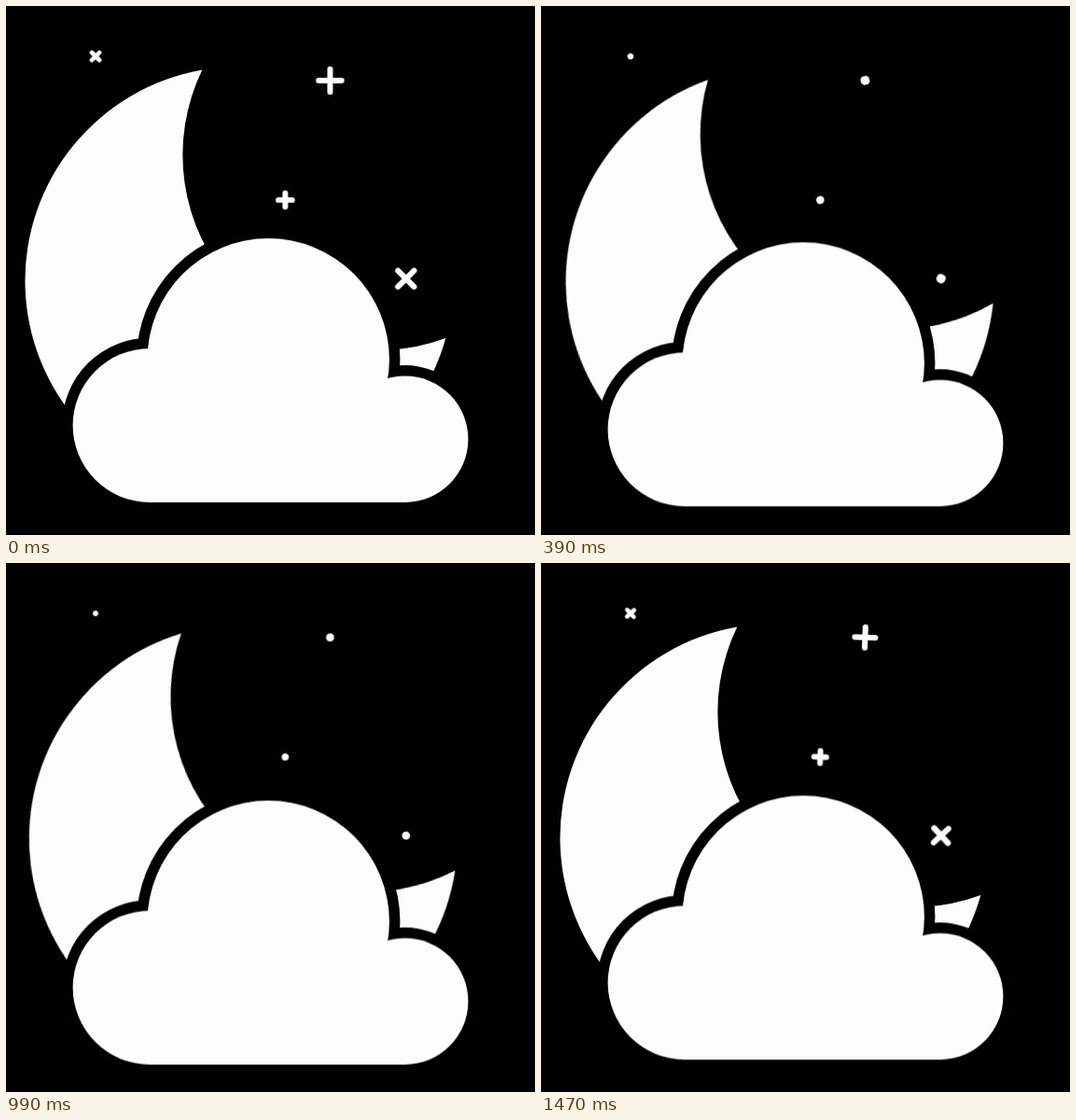
Animation, 567 px wide and 567 px high, one loop 1.5 s. Source, as an HTML page:

```html
<!DOCTYPE html>
<html lang="en">
<head>
<meta charset="utf-8">
<title>Cloudy night</title>
<style>
  html, body {
    margin: 0;
    width: 100%;
    height: 100%;
    overflow: hidden;
    background: #010101;
  }
  svg {
    display: block;
    width: 567px;
    height: 567px;
    fill: #fcfcfc;
  }

  .moon {
    transform-origin: 257.4px 258.9px;
    animation: swing 1.5s ease infinite;
  }
  .cloud { animation: sink .75s linear infinite alternate; }
  .gap {
    fill: #010101;
    stroke: #010101;
    stroke-width: 23px;
  }

  .star path {
    fill: none;
    stroke: #fcfcfc;
    stroke-linecap: round;
    stroke-width: var(--thin);
    vector-effect: non-scaling-stroke;
    animation:
      shrink .75s cubic-bezier(.3333, 1, .6667, 1) infinite alternate,
      spin .75s linear infinite alternate;
  }

  @keyframes swing {
    0%, 100% { transform: rotate(0deg); }
    51.7%, 54.3% { transform: rotate(-12deg); }
  }
  @keyframes sink {
    to { transform: translateY(8.2px); }
  }
  @keyframes shrink {
    from { scale: 1; }
    to { scale: .02; }
  }
  @keyframes spin {
    from { rotate: 0deg; stroke-width: var(--thin); }
    to { rotate: 55deg; stroke-width: var(--dot); }
  }
</style>
</head>
<body>
<svg viewBox="0 0 567 567">
  <defs>
    <g id="puffs">
      <circle cx="281.2" cy="378.8" r="129.7"/>
      <circle cx="154" cy="449.5" r="82.4"/>
      <circle cx="427.7" cy="464.2" r="67.7"/>
      <path d="M154 449.5L281 378.8L427.7 464.2V531.9H154Z"/>
    </g>
  </defs>

  <path class="moon" d="M210.3 68.5A229.6 229.6 0 1 0 471.3 356A209.3 209.3 0 0 1 210.3 68.5Z"/>

  <g class="cloud">
    <use href="#puffs" class="gap"/>
    <use href="#puffs"/>
  </g>

  <g class="star" transform="translate(347.4 79.8)" style="--thin:6px;--dot:8px">
    <path d="M-12.3 0H12.3M0-12.3V12.3"/>
  </g>
  <g class="star" transform="translate(299.3 208)" style="--thin:5.9px;--dot:7.4px">
    <path d="M-7.4 0H7.4M0-7.4V7.4"/>
  </g>
  <g class="star" transform="translate(428.8 292.2) rotate(45)" style="--thin:6px;--dot:8px">
    <path d="M-12.3 0H12.3M0-12.3V12.3"/>
  </g>
  <g class="star" transform="translate(96 54) rotate(45)" style="--thin:4.6px;--dot:5.6px">
    <path d="M-5.8 0H5.8M0-5.8V5.8"/>
  </g>
</svg>
</body>
</html>
```
